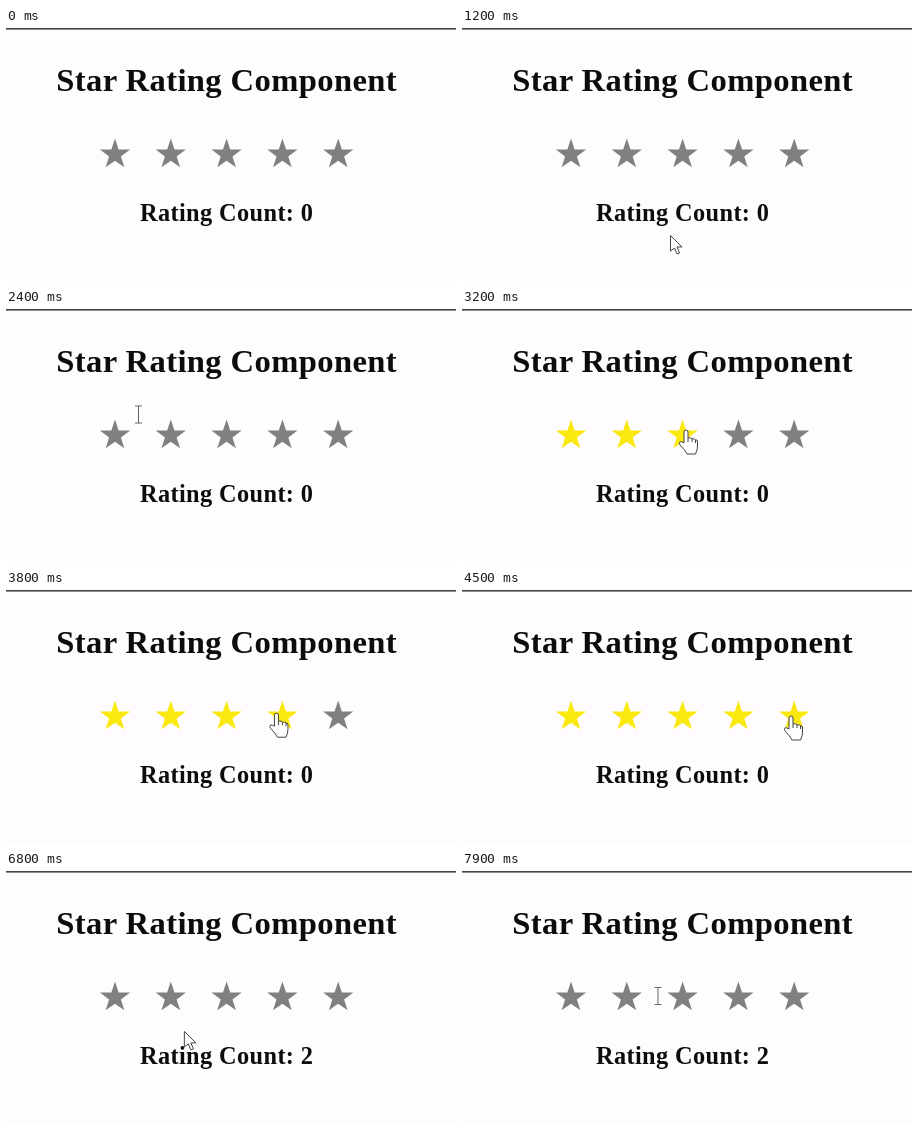
An HTML page that plays this animation: 450x253 px, repeating every 8 s.

```html
<!DOCTYPE html>
<html lang="en">
<head>
<meta charset="utf-8">
<title>Star Rating Component</title>
<style>
  html, body { margin: 0; width: 100%; height: 100%; overflow: hidden; background: #fefcfe; }
  svg { display: block; width: 100vw; height: 100vh; }
  text { font-family: "Liberation Serif", "Times New Roman", serif; font-weight: bold; text-anchor: middle; fill: #0c0c0c; }
  .title { font-size: 32.6px; letter-spacing: .4px; }
  .count { font-size: 24.3px; letter-spacing: .4px; }
  #pointer path { fill: #fff; stroke: #444; stroke-linejoin: round; }
  #pointer #beam { fill: none; stroke: #666; }
</style>
</head>
<body>
<svg viewBox="0 0 450 253">
  <rect width="450" height="1.6" fill="#444246"/>
  <text class="title" x="220.7" y="63">Star Rating Component</text>
  <g id="stars"></g>
  <text class="count" x="220.7" y="193">Rating Count: <tspan id="count">0</tspan></text>
  <g id="pointer">
    <path id="arrow" d="M.5 .5V16l4-3 2.500 6 2.600-1-2.600-6H12Z"/>
    <path id="beam" d="M-3.500-8.500h7m-3.500 0v17m-3.500 0h7"/>
    <path id="hand" d="M-2 13V2a2 2 0 0 1 4 0V8q3-1 4 1 3-1 3.500 1 2-1 2 2v4q0 4-2 8H1q-2-4-7-9-2-4 2-3ZM2 8v4m4-3v3m3.500-2v3"/>
  </g>
</svg>
<script>
const $ = id => document.getElementById(id);
const LOOP = 8000, STEP = 100, CLICK = 6600;
const ROW = 126.5, PITCH = 55.8;
const starX = i => 109 + PITCH * i;

// Key poses of the pointer: [time, x, y]
const poses = [
  [1200, 208, 207], [1600, 212, 84], [2000, 112, 112], [2400, 132.5, 105.5],
  [3200, 224, 121], [4500, 329, 126], [4800, 318, 184], [5300, 200, 71],
  [5800, 170.5, 113], [CLICK, 168, 124], [7100, 196, 226], [7300, 196, 226],
  [7600, 172, 140], [7900, 196, 125]
];

const starPoints = cx => Array.from({ length: 10 }, (_, k) => {
  const r = k % 2 ? 6.2 : 15.9, a = (k / 5 - .5) * Math.PI;
  return [cx + r * Math.cos(a), ROW + r * Math.sin(a)];
}).join(" ");

const stars = Array.from({ length: 5 }, (_, i) => {
  const star = document.createElementNS("http://www.w3.org/2000/svg", "polygon");
  star.setAttribute("points", starPoints(starX(i)));
  return $("stars").appendChild(star);
});

const ease = k => k * k * (3 - 2 * k);

function pointerAt(t) {
  const next = poses.findIndex(p => p[0] > t);
  if (next < 0) return poses.at(-1).slice(1);
  if (next === 0) return null;
  const [t0, x0, y0] = poses[next - 1], [t1, x1, y1] = poses[next];
  const k = ease((t - t0) / (t1 - t0));
  return [x0 + (x1 - x0) * k, y0 + (y1 - y0) * k];
}

// Lines of selectable text, measured around the stage centre
const onLine = (x, y, midY, halfW, halfH) =>
  Math.abs(x - 220.5) < halfW && Math.abs(y - midY) < halfH;
const overText = (x, y) =>
  onLine(x, y, 53, 170, 20) || onLine(x, y, ROW, 128, 25) || onLine(x, y, 185, 86, 13);

function draw(now) {
  const t = Math.floor(now % LOOP / STEP) * STEP;
  const pos = pointerAt(t);
  let hovered = -1, shape = "";
  if (pos) {
    const [x, y] = pos;
    hovered = stars.findIndex((_, i) => Math.hypot(x - starX(i), y - ROW) < 20);
    shape = hovered >= 0 ? "hand" : overText(x, y) ? "beam" : "arrow";
    $("pointer").setAttribute("transform", `translate(${x} ${y})`);
  }
  for (const id of ["arrow", "beam", "hand"]) $(id).style.display = id === shape ? "" : "none";
  stars.forEach((star, i) => star.setAttribute("fill", i <= hovered ? "#fae80e" : "#808080"));
  $("count").textContent = t < CLICK ? 0 : 2;
}

const start = performance.now();
function tick() {
  draw(performance.now() - start);
  requestAnimationFrame(tick);
}
tick();
</script>
</body>
</html>
```
